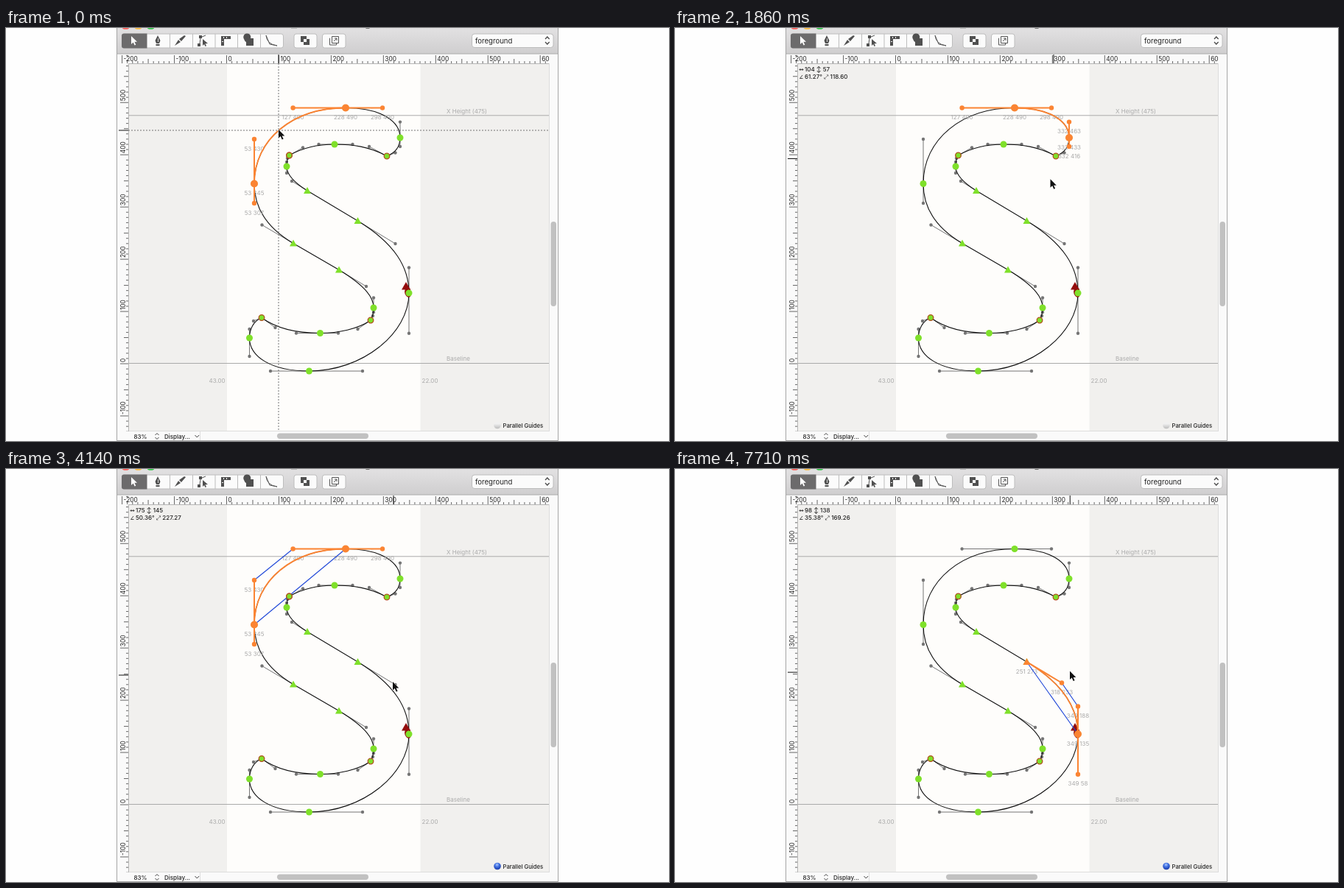
Recreate the animation shown at these times as an HTML page. Size 900 by 561 pixels, loop 8000 ms.

```html
<!DOCTYPE html>
<html lang="en">
<head>
<meta charset="utf-8">
<title>Parallel guides</title>
<style>
html, body { margin: 0; width: 100%; height: 100%; overflow: hidden; background: #fefefe; }
svg { display: block; }
text { font: 8px Inter, "Liberation Sans", sans-serif; fill: #222; }
.dim text, text.dim { fill: #aaa; }
.ruler text { font-size: 8.3px; }
.mid { text-anchor: middle; }
.bold { font-weight: 500; }
.key { font: 60px "Liberation Sans", sans-serif; fill: #fff; }
</style>
</head>
<body>
<svg id="stage" width="900" height="561" viewBox="0 0 900 561">
  <defs>
    <linearGradient id="bar" x2="0" y2="1"><stop stop-color="#e2e1e2"/><stop offset="1" stop-color="#cfcecf"/></linearGradient>
    <radialGradient id="ball" cx=".45" cy=".3" r=".7"><stop stop-color="#a9c6ff"/><stop offset=".45" stop-color="#3f6fe0"/><stop offset="1" stop-color="#1838a8"/></radialGradient>
    <linearGradient id="dull" x2="0" y2="1"><stop offset=".3" stop-color="#f0f0f0"/><stop offset="1" stop-color="#bbb"/></linearGradient>
    <clipPath id="rulers"><path d="M152 35H737V48H152zM152 48h14V548h-14z"/></clipPath>
  </defs>
  <g id="window">
    <path fill="#f1f0ee" d="M150 0H750V561H150z"/>
    <path fill="#fefdfb" d="M300 48H562.5V548H300z"/>
    <path fill="none" stroke="#aaa" d="M166 118.8H737M166 455.5H737"/>
    <g class="dim">
      <text x="598" y="115.5">X Height (475)</text>
      <text x="598" y="452">Baseline</text>
      <text x="275.5" y="481.5">43.00</text>
      <text x="564.5" y="481.5">22.00</text>
    </g>

    <path fill="#fafafa" d="M737 35H749V560H737zM151 548H749V560H151zM151 35H737V48H166V548H151z"/>
    <path fill="none" stroke="#ddd" d="M737.5 48V548M166 547.5H737M263.5 548V560"/>
    <path fill="none" stroke="#b5b5b5" d="M166.5 548V48.500H737"/>
    <rect x="739.5" y="263" width="7.500" height="115" rx="3.700" fill="#c1c1c1"/>
    <rect x="368" y="550.5" width="124" height="7.500" rx="3.700" fill="#c1c1c1"/>
    <text x="173.5" y="557.5" class="bold">83%</text>
    <text x="215" y="557.5" class="bold">Display...</text>
    <path fill="none" stroke="#444" d="M202.500 553l2.500-2.500 2.500 2.500M202.500 556l2.500 2.500 2.500-2.500M256.500 553l2.800 3 2.800-3"/>
    <g id="ticks" class="ruler" clip-path="url(#rulers)"></g>

    <path fill="url(#bar)" d="M150 0H750V35H150z"/>
    <path stroke="#aaa" d="M150 35H750"/>
    <path fill="#fc605b" d="M158 0a4.500 1.800 0 0 0 9 0z"/>
    <path fill="#fdbc40" d="M175 0a4.500 1.800 0 0 0 9 0z"/>
    <path fill="#34c84a" d="M192 0a4.500 1.800 0 0 0 9 0z"/>
    <path stroke="#777" d="M488.500 .5h5"/>
    <path stroke="#bbb" d="M387 .5h8"/>
    <g fill="#fbfbfb" stroke="#bdbdbd">
      <rect x="157.500" y="8" width="219" height="19" rx="3"/>
      <rect x="391" y="8" width="31" height="19" rx="3"/>
      <rect x="429.500" y="8" width="31.500" height="19" rx="3"/>
      <rect x="632.500" y="8" width="110.500" height="18.500" rx="3.500"/>
      <path d="M222.500 8v19M253.500 8v19M284 8v19M314.500 8v19M345.500 8v19"/>
    </g>
    <path fill="#6c6b6c" d="M160 7.500h31.500v20H160q-3 0-3-3v-14q0-3 3-3z"/>
    <path fill="#fff" d="M170 11v11l2.700-2.500 1.900 4 1.700-.8-1.900-4h3.600z"/>
    <g fill="#505050">
      <path d="M206 10l3.500 7-1.500 4h-4l-1.500-4zM203.500 22h5v2h-5z"/>
      <path d="M229 24l5-8 3 3zM235 15l7-5 2 1-6 7z"/>
      <path d="M267 15l7 6-3.500.3 1.500 3-1.500.7-1.500-3-2 2zM260 21h4v4h-4zM262 10h4v4h-4z"/>
      <path d="M292 11h13v4h-9v9h-4z"/>
      <path d="M323 15a5 5 0 1 1 9-1h4v10h-10v-5q-2-1-3-4z"/>
      <path d="M400 11h8v4h4v8h-8v-4h-4z"/>
    </g>
    <path fill="#fbfbfb" d="M404 15h4v4h-4zM206 14h.8v5h-.8zM295 12h1v2h-1zM299 12h1v2h-1zM293 18h2v1h-2z"/>
    <path fill="none" stroke="#555" d="M264 14l-1 7M266 12l5-2M353 10q1 12 15 14M353 10l5 12 10 2M440 14h-.500v9h9v-2M442.500 11.500h9v9h-9zM445 18l4-4M446 14h3v3"/>
    <text x="637" y="20.500" style="font-size:9.600px">foreground</text>
    <path fill="none" stroke="#444" stroke-width="1.200" d="M732 15l2.800-3 2.800 3M732 19l2.800 3 2.800-3"/>
    <path fill="none" stroke="#a5a5a5" d="M150.500 0V560.500H749.500V0"/>
    <text x="674.500" y="542.500" class="bold" style="font-size:7.700px">Parallel Guides</text>
  </g>
  <g id="live"></g>
</svg>
<script>
const SCALE = 0.7095, X0 = 299.5, Y0 = 456;
const ORANGE = '#fb8433', GREEN = '#7fe02a', GREY = '#757575';
const $ = id => document.getElementById(id);
const unitX = x => Math.round((x - X0) / SCALE);
const unitY = y => Math.round((Y0 - y) / SCALE);

// node x, y, kind (o smooth, c corner, t tangent), then the two handles towards the next node
const OUTLINE = [
  [461, 108.5, 'o', 511, 108.5, 535, 127.6],
  [535, 149, 'o', 535, 161, 528.5, 169.5],
  [517, 174, 'c', 493, 161, 470.5, 158],
  [446, 158, 'o', 424.5, 158, 403, 162.5],
  [384.5, 173, 'c', 382, 177, 381, 182],
  [381, 188, 'o', 381, 197, 388, 208],
  [409, 221, 't'],
  [477.5, 262, 't', 528.5, 293, 547, 325.5],
  [547, 360, 'o', 547, 414.8, 484, 466],
  [411.5, 466, 'o', 359, 466, 330.5, 446],
  [330.5, 421, 'o', 330.5, 409, 336, 398],
  [347, 393.5, 'c', 365.5, 407, 394, 414.5],
  [426.5, 414.5, 'o', 451, 414.5, 477.5, 409],
  [495, 397, 'c', 498, 391, 499, 386],
  [499, 380, 'o', 499, 366.500, 489, 351],
  [452, 328.5, 't'],
  [390, 292.5, 't', 347.5, 267.5, 337, 238],
  [337, 211.5, 'o', 337, 151, 389.6, 108.5]
];
const COUNT = OUTLINE.length, UPPER_LEFT = 17, UPPER_RIGHT = 0, LOWER_RIGHT = 7;

// step, x, y of the pointer
const POINTER = [
  [0, 370, 139], [2, 372, 138], [4, 440, 122], [6, 512, 118], [8, 514, 117], [9, 523, 120],
  [10, 523, 120], [14, 505, 235], [17, 505, 235], [19, 478, 201], [20, 455, 162], [23, 372, 140],
  [25, 370, 139], [26, 370, 139], [28, 526, 280], [29, 525, 290], [30, 535, 313], [32, 538, 325],
  [35, 546, 395], [38, 538, 325], [41, 537, 318], [44, 537, 318], [50, 537, 278], [54, 536, 275.5]
];
const PRESSES = [[0, 0], [9, 10], [25, 26], [30, 30], [43, 50]];

function pointerAt(n) {
  let i = POINTER.findIndex(k => k[0] >= n);
  if (i < 0) i = POINTER.length - 1;
  const b = POINTER[i], a = POINTER[Math.max(0, i - 1)];
  const f = a === b ? 1 : Math.min(1, (n - a[0]) / (b[0] - a[0]));
  return [a[1] + (b[1] - a[1]) * f, a[2] + (b[2] - a[2]) * f];
}

const line = (x1, y1, x2, y2, color, w = 1) =>
  `<path d="M${x1} ${y1}L${x2} ${y2}" stroke="${color}" stroke-width="${w}"/>`;
const dot = (x, y, r, fill, extra = '') =>
  `<circle cx="${x}" cy="${y}" r="${r}" fill="${fill}" ${extra}/>`;
const text = (x, y, s, cls = '') => `<text x="${x}" y="${y}" class="${cls}">${s}</text>`;

function segment(nodes, i) {
  const a = nodes[i], b = nodes[(i + 1) % COUNT];
  return a.length > 3 ? `C${a.slice(3)} ${b[0]} ${b[1]}` : `L${b[0]} ${b[1]}`;
}

function node([x, y, kind], on) {
  const fill = on ? ORANGE : GREEN;
  if (kind === 't') return `<path d="M${x} ${y - 5}l5 9h-10z" fill="${fill}"/>`;
  if (kind === 'c') return dot(x, y, 3.8, fill, 'stroke="#b0501c" stroke-width="1.300"');
  return dot(x, y, on ? 5 : 4.5, fill);
}

function handles(nodes) {
  let lines = '', dots = '';
  nodes.forEach((a, i) => {
    if (a.length < 4) return;
    const b = nodes[(i + 1) % COUNT];
    lines += line(a[0], a[1], a[3], a[4], GREY) + line(b[0], b[1], a[5], a[6], GREY);
    dots += dot(a[3], a[4], 2.2, GREY) + dot(a[5], a[6], 2.2, GREY);
  });
  return lines + dots;
}

function selection(nodes, i, guide) {
  const a = nodes[i], b = nodes[(i + 1) % COUNT], prev = nodes[(i + COUNT - 1) % COUNT];
  const arms = [[a, a[3], a[4]], [b, a[5], a[6]]];
  if (prev.length > 3) arms.push([a, prev[5], prev[6]]);
  if (b.length > 3) arms.push([b, b[3], b[4]]);
  const points = [a, b, ...arms.map(h => h.slice(1))];
  let s = points.map(([x, y]) => text(x, y + 15.5, unitX(x) + ' ' + unitY(y), 'dim mid')).join('');
  if (guide) s += line(a[0], a[1], b[0], b[1], guide, 1.1) + line(a[3], a[4], a[5], a[6], guide, 1.1);
  s += `<path d="M${a[0]} ${a[1]}${segment(nodes, i)}" fill="none" stroke="${ORANGE}" stroke-width="1.800"/>`;
  s += arms.map(([p, x, y]) => line(p[0], p[1], x, y, ORANGE, 2) + dot(x, y, 3.2, ORANGE)).join('');
  return s + node(a, true) + node(b, true);
}

function measures(nodes, i) {
  const a = nodes[i], b = nodes[(i + 1) % COUNT];
  const w = Math.abs(unitX(a[0]) - unitX(b[0])), h = Math.abs(unitY(a[1]) - unitY(b[1]));
  const angle = (Math.atan2(w, h) * 180 / Math.PI).toFixed(2);
  return `<path d="M169 56.500h5M170.500 55l-1.500 1.500 1.500 1.500M172.500 55l1.500 1.500-1.500 1.500M173 64l-3.500 4.500h4" fill="none" stroke="#222" stroke-width=".8"/>` +
    text(176, 59.3, `${w} ↕ ${h}`, 'bold') +
    text(176, 68.6, `${angle}° ⤢ ${Math.hypot(w, h).toFixed(2)}`, 'bold');
}

function draw(n) {
  $('window').style.display = n === 1 ? 'none' : '';
  if (n === 1) { $('live').innerHTML = ''; return; }

  const drag = Math.max(0, Math.min(1, (n - 44) / 6));
  const nodes = OUTLINE.map(p => p.slice());
  const c = nodes[LOWER_RIGHT];
  c[3] -= 3.5 * drag; c[4] -= 2.5 * drag; c[6] -= 3 * drag;

  const picked = n < 9 ? UPPER_LEFT : n < 25 ? UPPER_RIGHT : n < 30 ? UPPER_LEFT : LOWER_RIGHT;
  const pressed = PRESSES.some(([a, b]) => n >= a && n <= b);
  const guidesOn = n >= 17;
  const parallel = picked === UPPER_LEFT || drag === 1;
  const guide = guidesOn && (parallel ? '#1d45d8' : '#c23a1c');
  const [x, y] = pointerAt(n);
  const [tx, ty] = pressed ? [x, y] : pointerAt(n > 2 ? n - 1 : n);

  let s = handles(nodes);
  s += `<path d="M${nodes[0][0]} ${nodes[0][1]}${nodes.map((_, i) => segment(nodes, i)).join('')}z" fill="none" stroke="#111" stroke-width="1.100"/>`;
  s += `<path d="M543 345l6 10.500h-12z" fill="#930d0d"/><path d="M542 354q-3 8 4 12l3-1v-11z" fill="#930d0d"/>`;
  s += nodes.map(p => node(p)).join('') + selection(nodes, picked, guide);
  if (picked === UPPER_LEFT) s += node(nodes[4]);
  if (!pressed || n >= 43) s += measures(nodes, picked);
  if (pressed) s += `<path d="M${x} 48V547M166 ${y}H737" stroke="#666" stroke-width=".9" stroke-dasharray="2 2"/>`;
  s += `<path d="M${tx} 36V48M153 ${ty}H166" stroke="#111"/>`;
  s += dot(667, 539.5, 4.8, guidesOn ? 'url(#ball)' : 'url(#dull)');
  if (n >= 17 && n <= 22) s += `<rect x="454.500" y="476" width="33" height="70" rx="10" fill="#2e2d2d"/>` + text(471, 537, '/', 'key mid');
  const grip = n >= 43 && pressed ? 2.5 : 0;
  s += `<path transform="translate(${x - grip} ${y - grip})" d="M0-1v11.500l2.700-2.400 2 4.500 1.900-.8-2-4.400h3.700z" fill="#111" stroke="#fff" stroke-width=".9" paint-order="stroke"/>`;
  $('live').innerHTML = s;
}

function buildRulers() {
  let d = '', labels = '';
  for (let u = -210; u <= 620; u += 10) {
    const size = u % 100 === 0 ? 11 : u % 50 === 0 ? 6 : 3;
    const x = X0 + u * SCALE, y = Y0 - u * SCALE;
    d += `M${x} 48v${-size}M166 ${y}h${-size}`;
    if (u % 100 === 0) {
      labels += text(x + 2, 44.7, u);
      if (u < 600) labels += `<text transform="translate(161.500 ${y - 2}) rotate(-90)">${u}</text>`;
    }
  }
  $('ticks').innerHTML = `<path d="${d}" stroke="#555" stroke-width=".9"/>` + labels;
}

// seven steps a second, each start rounded to 10 ms
const startOf = n => Math.round(n * 100 / 7) * 10;
let shown = -1;
function tick() {
  const t = performance.now() % 8000;
  let n = Math.floor(t * 7 / 1000);
  if (t >= startOf(n + 1)) n++;
  else if (t < startOf(n)) n--;
  n = Math.min(n, 54);
  if (n !== shown) draw(shown = n);
  requestAnimationFrame(tick);
}
buildRulers();
tick();
</script>
</body>
</html>
```
